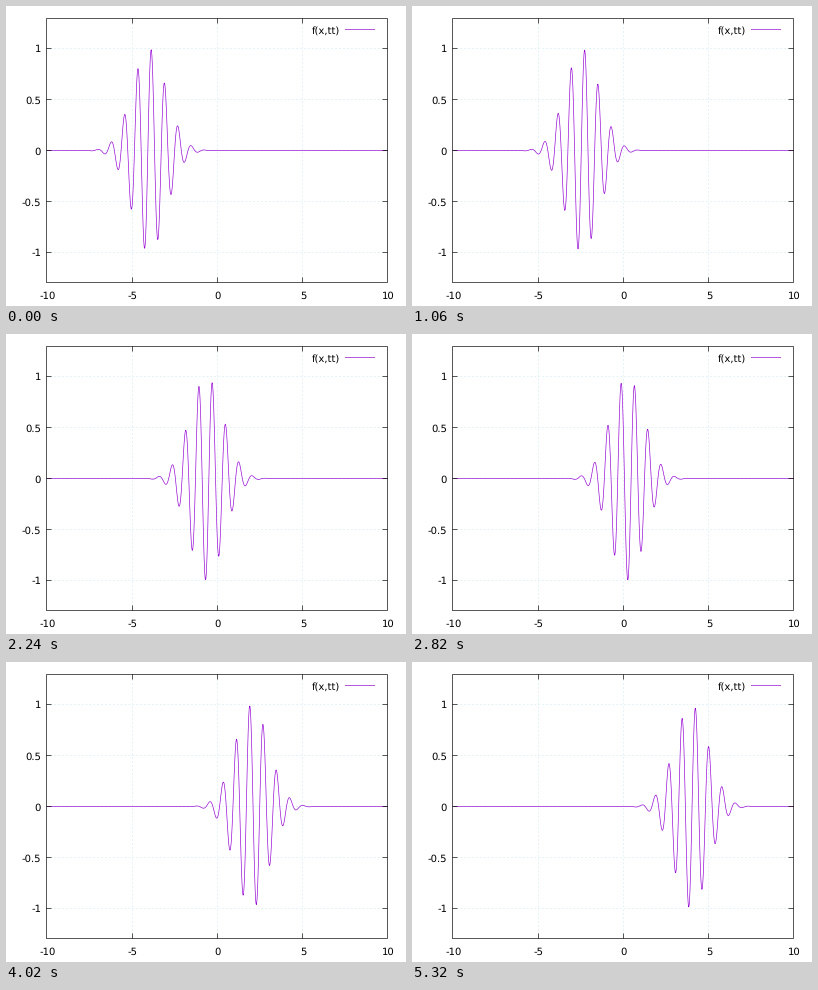
These frames come from a looping animation (400 px wide and 300 px high, 5340 ms). A matplotlib script:

```python
import numpy as np
import matplotlib.pyplot as plt
from matplotlib.animation import FuncAnimation

W, H = 400, 300
LEFT, RIGHT, TOP, BOTTOM = 40.8, 381.8, 12.5, 276.5
TICK = 5
FRAMES, STEP = 267, 0.03
PURPLE, GRID = "#9400d3", "#d8ecf4"

# At 72 dpi one point is one pixel.
plt.rcParams.update({"font.family": "DejaVu Sans", "font.size": 10,
                     "text.hinting": "none", "path.snap": False,
                     "path.simplify": False, "lines.linewidth": 0.65,
                     "lines.solid_capstyle": "butt"})

fig = plt.figure(figsize=(W / 72, H / 72), dpi=72, facecolor="white")
ax = fig.add_axes([0, 0, 1, 1])
ax.set(xlim=(0, W), ylim=(H, 0))
ax.axis("off")


def px(x):
    return LEFT + (x + 10) / 20 * (RIGHT - LEFT)


def py(y):
    return BOTTOM - (y + 1.3) / 2.6 * (BOTTOM - TOP)


def crisp(v):
    return np.floor(v) + 0.5


def line(xs, ys, color="black", **kw):
    return ax.plot(xs, ys, color=color, **kw)[0]


x0, x1, y0, y1 = crisp(LEFT), crisp(RIGHT), crisp(TOP), crisp(BOTTOM)
dotted = dict(color=GRID, ls=(0, (3, 3)), zorder=1)

for x in (-10, -5, 0, 5, 10):
    c = crisp(px(x))
    if abs(x) < 10:
        line([c, c], [y1, y0], **dotted)
        line([c, c], [y1, y1 - TICK], zorder=4)
        line([c, c], [y0, y0 + TICK], zorder=4)
    ax.text(px(x) + 0.5, 293, f"{x}", ha="center", va="baseline")

for y in (-1, -0.5, 0, 0.5, 1):
    c = crisp(py(y))
    line([x0, x1], [c, c], **dotted)
    line([x0, x0 + TICK], [c, c], zorder=4)
    line([x1, x1 - TICK], [c, c], zorder=4)
    ax.text(35.2, c + 4, f"{y:g}", ha="right", va="baseline")

line([x0, x1, x1, x0, x0], [y1, y1, y0, y0, y1], zorder=4,
     solid_joinstyle="miter")

# Legend
ax.text(305.3, 27.4, "f(x,tt)", va="baseline")
line([339, 369], [23.5, 23.5], PURPLE)

xs = np.linspace(-10, 10, 1000)
curve = line([], [], PURPLE, zorder=2)


def packet(x, t):
    return np.exp(-(x - t) ** 2 / 2) * np.sin(8 * (x - 2 * t))


def update(i):
    curve.set_data(px(xs), py(packet(xs, -4 + STEP * i)))
    return curve,


anim = FuncAnimation(fig, update, frames=FRAMES, interval=20,
                     repeat=True, repeat_delay=0)
plt.show()
```
